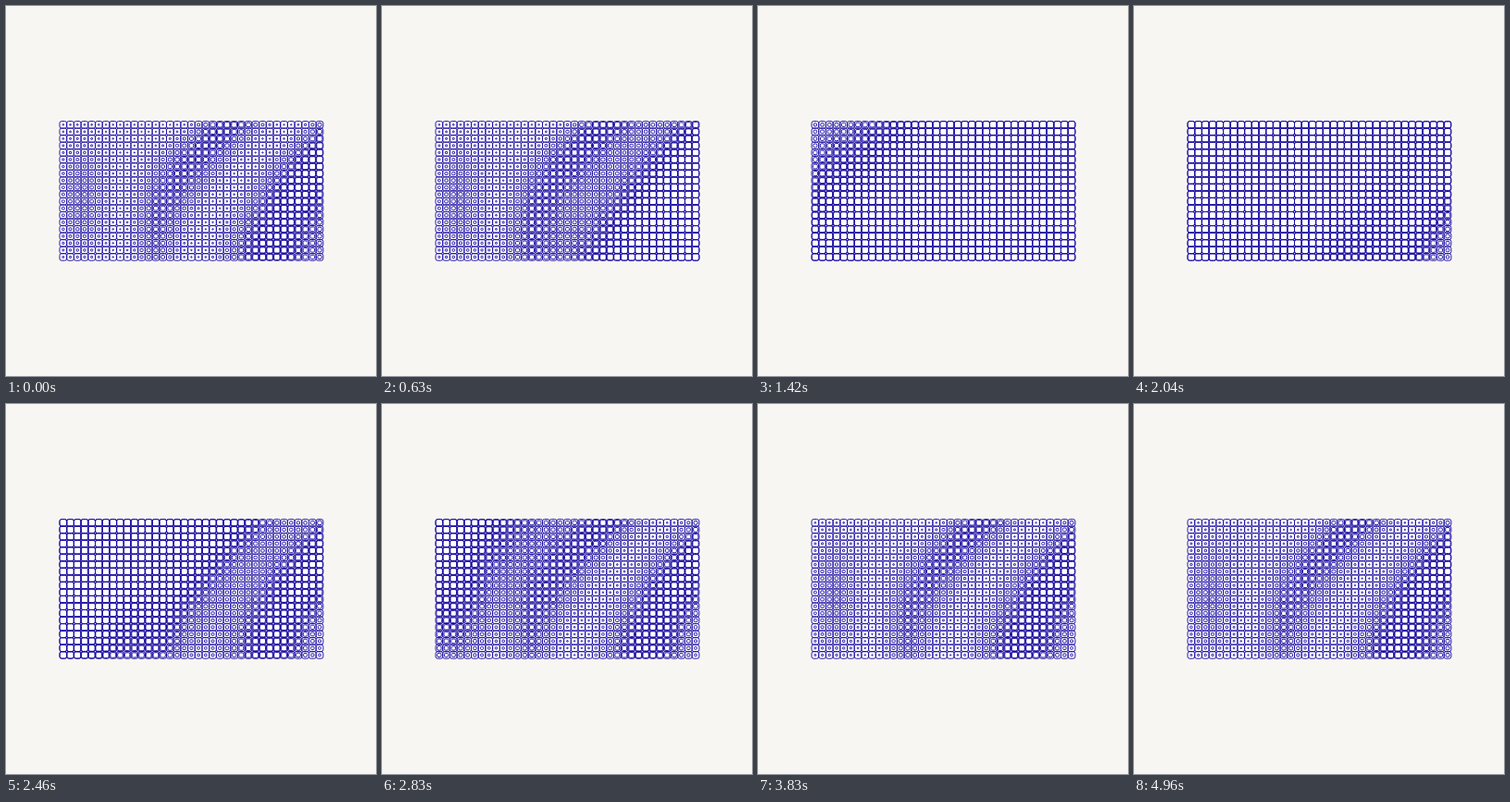
Animation, 400 px wide and 400 px high, one loop 5 s. Source, as an HTML page with a canvas:

```html
<!DOCTYPE html>
<html lang="en">
<head>
<meta charset="utf-8">
<title>Pulsing grid</title>
<style>
  html, body { margin: 0; width: 100%; height: 100%; overflow: hidden; background: #f7f6f2; }
  canvas { display: block; width: 400px; height: 400px; }
</style>
</head>
<body>
<canvas id="stage"></canvas>
<script>
const canvas = document.getElementById('stage');
const ctx = canvas.getContext('2d');
const ratio = window.devicePixelRatio || 1;
canvas.width = canvas.height = 400 * ratio;
ctx.scale(ratio, ratio);

const LOOP = 5000, COLS = 37, ROWS = 20;
const LEFT = 58, TOP = 124.6, STEP_X = 7.7, STEP_Y = 7.53;

const clamp = v => Math.max(0, Math.min(1, v));
const mix = (a, b, k) => a + (b - a) * k;
const smooth = v => v * v * (3 - 2 * v);

// Resting pattern: upright stripes on the left that lean, widen and strengthen to the right
function restSize(x, y) {
  const lean = clamp((x - 110) / 80), dy = y - 190;
  const across = x + lean * (.75 * dy - .003 * dy * dy);
  const stripe = .5 + .5 * Math.cos(2 * Math.PI * Math.log((across + 194) / 274) / .3165);
  const fade = mix(Math.exp(-(((y - 210) / 60) ** 2)), 1, lean);
  return .15 + stripe * fade * (.35 + .0014 * (x - 60));
}

// The swell starts in the bottom right corner and ends in the top left one
function swell(time, peak) {
  const wave = .5 + .5 * Math.cos((time - peak) / LOOP * 2 * Math.PI);
  return smooth(clamp(wave ** 3 / .85));
}

const cells = [];
for (let row = 0; row < ROWS; row++) {
  for (let col = 0; col < COLS; col++) {
    const x = LEFT + (col + .5) * STEP_X, y = TOP + (row + .5) * STEP_Y;
    const peak = 950 + 1000 * (1 - col / (COLS - 1)) + 450 * (1 - row / (ROWS - 1));
    cells.push({ x, y, peak, rest: restSize(x, y) });
  }
}

function box(x, y, size) {
  const w = STEP_X * size, h = STEP_Y * size;
  ctx.roundRect(x - w / 2, y - h / 2, w, h, 2.1 * size);
}

function draw(now) {
  const time = now % LOOP;
  ctx.fillStyle = '#f7f6f2';
  ctx.fillRect(0, 0, 400, 400);
  ctx.fillStyle = '#fff';
  ctx.strokeStyle = '#1a0ca0';
  ctx.lineWidth = .95;

  ctx.beginPath();
  for (const { x, y } of cells) box(x, y, 1);
  ctx.fill();
  for (const { x, y, rest, peak } of cells) box(x, y, mix(rest, 1, swell(time, peak)));
  ctx.stroke();
  requestAnimationFrame(draw);
}
requestAnimationFrame(draw);
</script>
</body>
</html>
```
